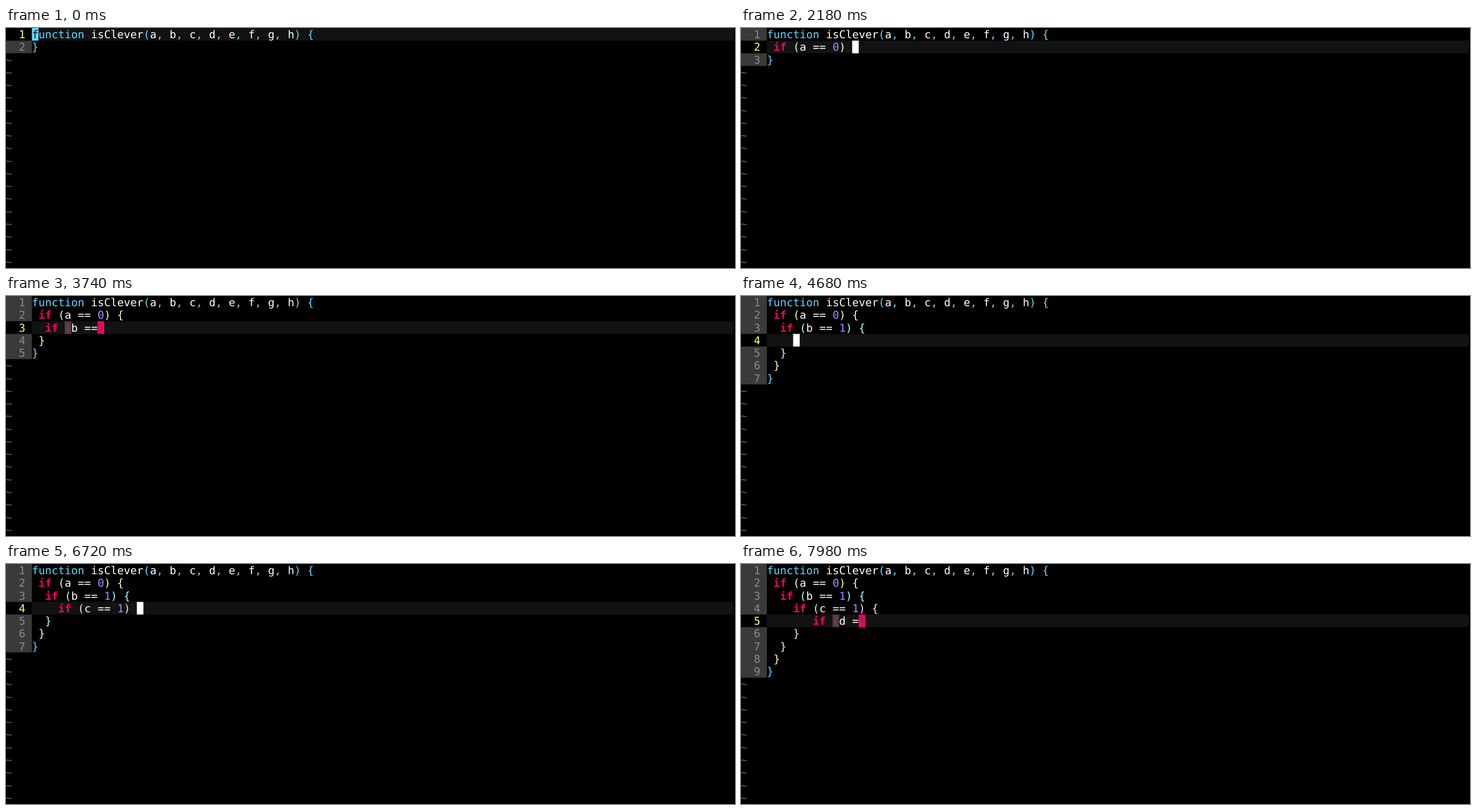
Write an HTML page with a canvas that moves like this. It is 1280 px wide and 423 px high and loops after 8 s.

```html
<!DOCTYPE html>
<html lang="en">
<head>
<meta charset="utf-8">
<title>Nested ifs in an editor</title>
<style>
  html, body { margin: 0; width: 100%; height: 100%; overflow: hidden; background: #000; }
  canvas { display: block; }
</style>
</head>
<body>
<canvas width="1280" height="423"></canvas>
<script>
const ctx = document.querySelector('canvas').getContext('2d');
const LOOP = 8000, ROWS = 19, COLS = 111, GUTTER = 4;
const CELL = 11.517, ROW = 423 / ROWS, BASELINE = 18.05;
const FONT = '19.13px "DejaVu Sans Mono", monospace';
const CYAN = '#5fd7ff', RED = '#ff005f', GRAY = '#444444', WHITE = '#ffffff';
const DEPTH = [CYAN, '#ffffaf', '#afffff', '#ffd7ff', '#d7ffaf'];

const HEAD = 'function isClever(a, b, c, d, e, f, g, h) {';

// Bars separate screen refreshes; a brace opens the next nested line.
const KEYS = ('if |(a| =|= |0|) |{|if| (|||b ==| |1|) |{|' +
  'if| (|c =|= |||1|) |{|i|f |(d| =').split('|');
const OPEN = 520, CURSOR = 540, TYPING = 910, REFRESH = 251.3;

const left = col => col * CELL - 0.58;
const pad = depth => ' '.repeat(1 + depth * (depth + 1) / 2);

function fill(col, row, cols, color, rows = 1) {
  ctx.fillStyle = color;
  ctx.fillRect(left(col), row * ROW, cols * CELL, rows * ROW);
}

function put(text, col, row, color, weight = '') {
  ctx.font = `${weight} ${FONT}`;
  ctx.fillStyle = color;
  [...text].forEach((ch, i) => ctx.fillText(ch, left(col + i), row * ROW + BASELINE));
}

function putCode(text, row, depth) {
  for (const { 0: token, index } of text.matchAll(/function|if|./g)) {
    const color = token === 'if' ? RED
      : token === 'function' || token === ',' ? CYAN
      : /[(){}]/.test(token) ? DEPTH[depth]
      : /\d/.test(token) ? '#af87ff' : WHITE;
    put(token, GUTTER + index, row, color, token === 'if' ? 'bold' : '');
  }
}

function putCursor(line, row) {
  const col = GUTTER + line.length, paren = line.indexOf('(');
  if (paren < 0 || line.includes(')')) return fill(col, row, 1, WHITE);
  fill(col, row, 1, RED);
  put(')', col, row, GRAY);
  fill(GUTTER + paren, row, 1, GRAY);
  put('(', GUTTER + paren, row, RED);
}

function draw(time) {
  const opened = time >= OPEN;
  const refreshes = Math.max(0, Math.floor((time - TYPING) / REFRESH) + 1);
  const typed = KEYS.slice(0, refreshes).join('').split('{');
  const body = opened ? typed.map((text, i) => pad(i) + text) : [];
  const active = body.length;

  const lines = [HEAD, ...body.map((line, i) => i < active - 1 ? line + '{' : line)];
  for (let i = active - 2; i >= 0; i--) lines.push(pad(i) + '}');
  lines.push('}');

  ctx.fillStyle = '#000';
  ctx.fillRect(0, 0, 1280, 423);
  fill(0, 0, GUTTER, '#3a3a3a', lines.length);
  fill(0, active, GUTTER, '#000');
  fill(GUTTER, active, COLS - GUTTER, '#121212');

  for (let row = 0; row < ROWS; row++) {
    if (row < lines.length) {
      put(String(row + 1), 2, row, row === active ? '#ffff5f' : '#8a8a8a');
      putCode(lines[row], row, Math.min(row, lines.length - 1 - row + (row === active ? 1 : 0)));
    } else {
      put('~', 0, row, '#626262');
    }
  }

  if (!opened) {
    fill(GUTTER, 0, 1, CYAN);
    put('f', GUTTER, 0, '#121212');
  } else if (time >= CURSOR) {
    putCursor(body[active - 1], active);
  }
}

function tick() {
  draw(performance.now() % LOOP);
  requestAnimationFrame(tick);
}
ctx.textRendering = 'geometricPrecision';
tick();
</script>
</body>
</html>
```
